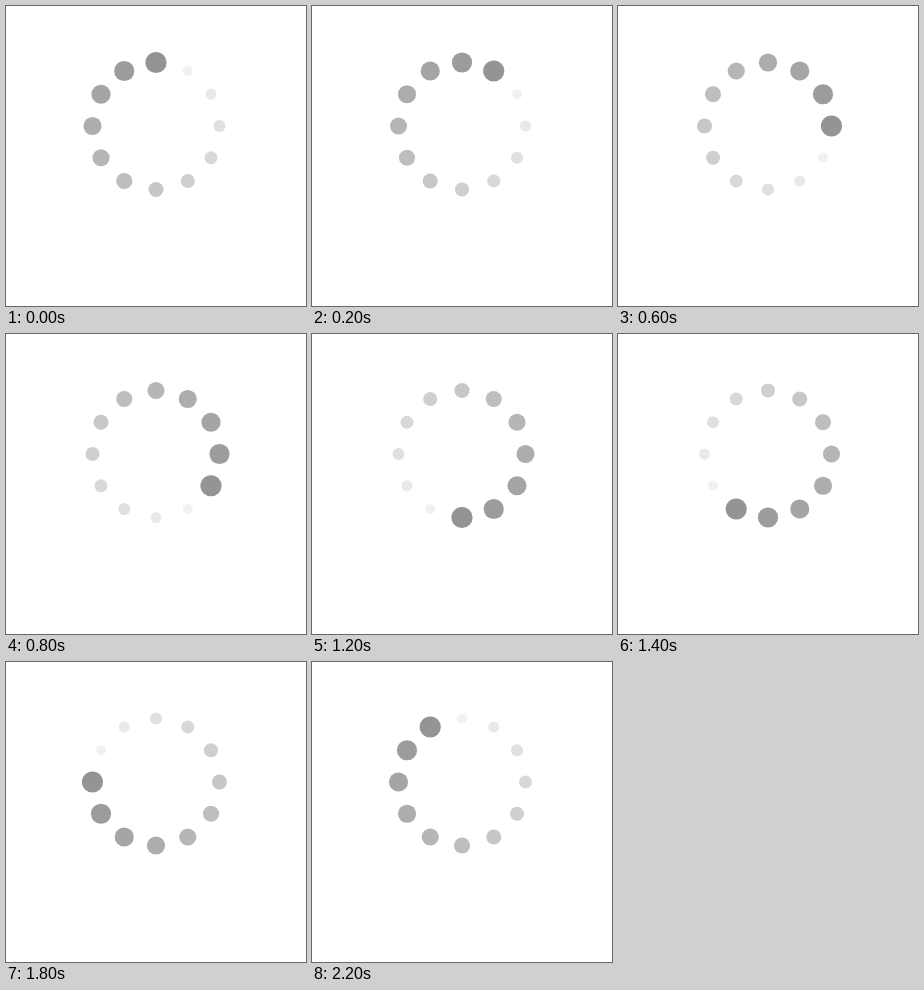
Write an HTML page that moves like this. It is 300 by 300 pixels and loops after 2400 ms.

```html
<!DOCTYPE html>
<html lang="en">
<head>
<meta charset="utf-8">
<title>Loading spinner</title>
<style>
  html, body { margin: 0; width: 100%; height: 100%; overflow: hidden; background: #fff; }
  svg { display: block; width: 100%; height: 100%; }
</style>
</head>
<body>
<svg id="stage" viewBox="0 0 300 300"></svg>
<script>
const COUNT = 12, STEP_MS = 200;
const CENTER = { x: 150, y: 120 }, RING = 63.5;
const HEAD = { radius: 10.6, gray: 148 }, TAIL = { radius: 5, gray: 241 };

const stage = document.getElementById('stage');
const mix = (a, b, t) => a + (b - a) * t;

const dots = Array.from({ length: COUNT }, (_, i) => {
  const angle = i / COUNT * 2 * Math.PI;
  const dot = document.createElementNS('http://www.w3.org/2000/svg', 'circle');
  dot.setAttribute('cx', CENTER.x + RING * Math.sin(angle));
  dot.setAttribute('cy', CENTER.y - RING * Math.cos(angle));
  return stage.appendChild(dot);
});

// Each dot shrinks and fades with its distance behind the head.
function draw(ms) {
  const head = Math.floor(ms / STEP_MS) % COUNT;
  dots.forEach((dot, i) => {
    const age = (head - i + COUNT) % COUNT / (COUNT - 1);
    const gray = Math.round(mix(HEAD.gray, TAIL.gray, age));
    dot.setAttribute('r', mix(HEAD.radius, TAIL.radius, age));
    dot.setAttribute('fill', `rgb(${gray},${gray},${gray})`);
  });
}

const start = performance.now();
function tick() {
  draw(performance.now() - start);
  requestAnimationFrame(tick);
}
tick();
</script>
</body>
</html>
```
